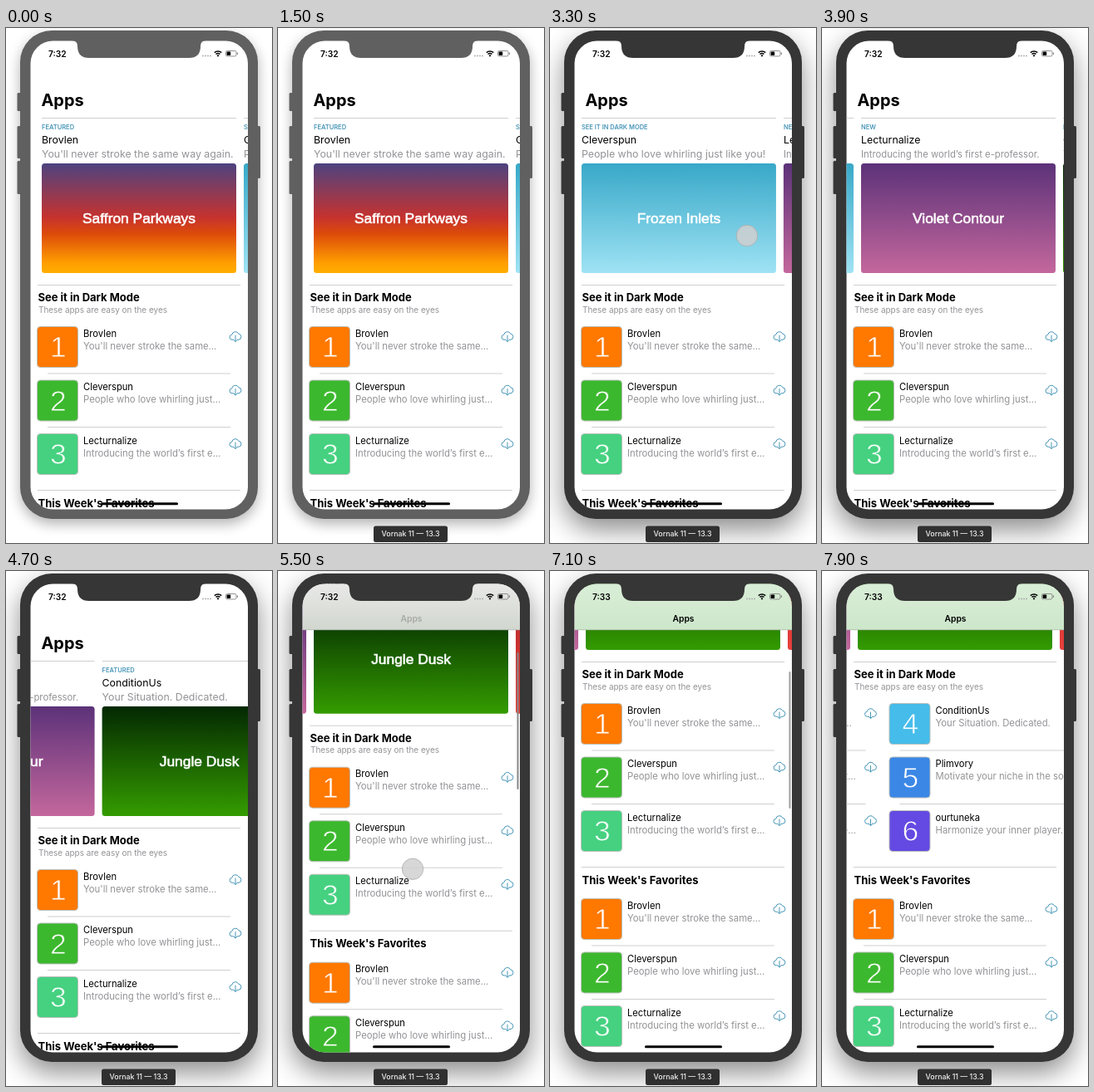
These frames come from a looping animation (320x620 px, 8 s). An HTML page:

```html
<!DOCTYPE html>
<html lang="en">
<head>
<meta charset="utf-8">
<title>Apps browser</title>
<style>
html, body { margin: 0; width: 100%; height: 100%; overflow: hidden; background: #fff; }
svg { display: block; width: 320px; height: 620px; }
text { font-family: Inter, "Open Sans", sans-serif; white-space: pre; }
.poster { font-family: "Liberation Sans", Arial, sans-serif; }
</style>
</head>
<body>
<svg id="stage" viewBox="0 0 320 620" xmlns="http://www.w3.org/2000/svg"></svg>
<script>
const LOOP = 8000, CARD_PITCH = 243, LIST_PITCH = 261, ROW = 64.5, SECTION = 235;
const GRAY = '#939397', BLUE = '#4796b8', RULE = '#cfcfd1';

const cards = [
  { tag: 'FEATURED', name: 'Brovlen', line: "You'll never stroke the same way again.", title: 'Saffron Parkways',
    stops: ['#4d437f', '#8a3b58 25%', '#c5322f 49%', '#dc4a0a 64%', '#ff9f00 91%', '#ffae00'] },
  { tag: 'SEE IT IN DARK MODE', name: 'Cleverspun', line: 'People who love whirling just like you!', title: 'Frozen Inlets',
    stops: ['#38a8c8', '#9fe3f4'] },
  { tag: 'NEW', name: 'Lecturnalize', line: 'Introducing the world’s first e-professor.', lineSize: 11.3, title: 'Violet Contour',
    stops: ['#5c3279', '#c4679d'] },
  { tag: 'FEATURED', name: 'ConditionUs', line: 'Your Situation. Dedicated.', title: 'Jungle Dusk',
    stops: ['#032802', '#349c00'] },
  { tag: 'FEATURED', name: 'Plimvory', line: 'Motivate your niche.', title: 'Red Lantern',
    stops: ['#b82a2a', '#e8403c'] }
];

const apps = [
  ['Brovlen', "You'll never stroke the same...", '#ff7800'],
  ['Cleverspun', 'People who love whirling just...', '#3cb82e'],
  ['Lecturnalize', 'Introducing the world’s first e...', '#45d180'],
  ['ConditionUs', 'Your Situation. Dedicated.', '#45bcea'],
  ['Plimvory', 'Motivate your niche in the so...', '#3b87e6'],
  ['ourtuneka', 'Harmonize your inner player...', '#644ae2']
];

const text = (x, midY, size, str, attrs = '') =>
  `<text x="${x}" y="${midY + size * 0.36}" font-size="${size}" ${attrs}>${str}</text>`;
const rect = (x, y, w, h, fill, attrs = '') =>
  `<rect x="${x}" y="${y}" width="${w}" height="${h}" fill="${fill}" ${attrs}/>`;
const rule = (x, y, w) => rect(x, y - 0.5, w, 1, RULE);

const gradient = (stops, i) => `<linearGradient id="paint${i}" x1="0" y1="0" x2="0" y2="1">` +
  stops.map((stop, k) => {
    const [color, at] = stop.split(' ');
    return `<stop offset="${at || (k ? '100%' : '0%')}" stop-color="${color}"/>`;
  }).join('') + '</linearGradient>';

const card = (c, i) => `<g transform="translate(${43 + i * CARD_PITCH} 0)">` +
  rule(0, 108.5, 234) +
  text(0, 119.5, 7.5, c.tag, `font-weight="600" fill="${BLUE}"`) +
  text(0, 134.5, 12.35, c.name) +
  text(0, 151.5, c.lineSize || 12.35, c.line, `fill="${GRAY}"`) +
  rect(0, 163, 234, 132, `url(#paint${i})`, 'rx="3.5"') +
  text(117, 229, 17.4, c.title, 'class="poster" text-anchor="middle" fill="#fff" stroke="#fff" stroke-width=".6"') + '</g>';

const cloud = `<path d="M273.5 375.3h-1.2a3 3 0 0 1-.5-6a4.2 4.2 0 0 1 8-1.1a3.6 3.6 0 0 1 .2 7.1h-1.5
  M276 370v7.4m-2.2-2.1l2.2 2.3l2.2-2.3" fill="none" stroke="${BLUE}" stroke-width="1"
  stroke-linecap="round" stroke-linejoin="round"/>`;

// The tile-coloured stroke on the digit thins it to a light weight.
const appRow = ([name, line, color], i) =>
  `<g transform="translate(${Math.floor(i / 3) * LIST_PITCH} ${i % 3 * ROW})">` +
  rect(37.5, 359.5, 49, 49, color, 'rx="4" stroke="#b9bfba" stroke-width="1"') +
  text(62.8, 383.5, 35.5, i + 1, `class="poster" text-anchor="middle" fill="#fff" stroke="${color}" stroke-width=".8"`) +
  text(93, 367.5, 11.2, name) +
  text(93, 382.5, 11.3, line, `fill="${GRAY}"`) + cloud +
  (i % 3 < 2 ? rule(50, 416, 220) : '') + '</g>';

const section = (n, title, sub, rows) => `<g transform="translate(0 ${n * SECTION})">` +
  rule(38, n ? 321.5 : 309.5, 244) +
  text(38.5, n ? 337 : 324.5, 13, title, 'font-weight="700"') +
  (sub ? text(39, 339, 9.95, sub, `fill="${GRAY}"`) : '') +
  `<g ${n ? '' : 'id="list"'}>${rows.map(appRow).join('')}</g></g>`;

const statusBar = text(51, 31.5, 10.2, '7:32', 'id="clock" font-weight="600"') +
  [237, 240, 243, 246].map(x => `<circle cx="${x}" cy="33.5" r=".9" fill="#aaa"/>`).join('') +
  `<path d="M250.8 29.6a6.2 6.2 0 0 1 8.4 0M252.5 31.5a3.8 3.8 0 0 1 5 0" fill="none" stroke="#000" stroke-width="1.5"/>
  <path d="M253.6 33a2 2 0 0 1 2.8 0L255 34.8z"/>` +
  rect(264.5, 27.5, 12.5, 6.5, 'none', 'rx="1.8" stroke="#777" stroke-width=".8"') +
  rect(265.6, 28.6, 4.6, 4.3, '#000', 'rx=".7"') + rect(277.8, 29.5, 1, 2.5, '#777');

const outline = 'x="17" y="3" width="286" height="588" rx="38"';
const stage = document.getElementById('stage');
stage.innerHTML = `<defs>
  ${cards.map((c, i) => gradient(c.stops, i)).join('')}
  <linearGradient id="navPaint" x1="0" y1="0" x2="0" y2="1">
    <stop id="navTop" offset="0"/><stop id="navBottom" offset="1"/>
  </linearGradient>
  <clipPath id="screen"><rect x="29.5" y="15.5" width="261.5" height="564" rx="27"/></clipPath>
  <filter id="soft" x="-30%" y="-20%" width="160%" height="140%"><feGaussianBlur stdDeviation="8"/></filter>
  <filter id="deep" x="-30%" y="-20%" width="160%" height="140%"><feGaussianBlur stdDeviation="16"/></filter>
</defs>
<rect width="320" height="620" fill="#fff"/>
<rect id="restShadow" ${outline} transform="translate(0 6)" opacity=".3" filter="url(#soft)"/>
<rect id="liveShadow" ${outline} transform="translate(0 13)" opacity=".45" filter="url(#deep)"/>
<g id="shell">
  ${rect(13.5, 78, 6, 22, 'inherit', 'rx="1.5"')}${rect(13.5, 118, 6, 39, 'inherit', 'rx="1.5"')}
  ${rect(13.5, 160, 6, 40, 'inherit', 'rx="1.5"')}${rect(300, 118, 6, 63, 'inherit', 'rx="1.5"')}
  <rect ${outline}/>
</g>
<g clip-path="url(#screen)">
  <rect x="29" y="15" width="263" height="566" fill="#fff"/>
  <g id="page">
    ${text(42.5, 86.7, 19.9, 'Apps', 'font-weight="700"')}
    <g id="carousel">${cards.map(card).join('')}</g>
    ${section(0, 'See it in Dark Mode', 'These apps are easy on the eyes', apps)}
    ${section(1, 'This Week\'s Favorites', '', apps.slice(0, 3))}
    ${section(2, 'Learn Something', '', apps.slice(0, 3))}
  </g>
  <g id="nav">
    ${rect(29, 15, 263, 56, 'url(#navPaint)')}
    ${rect(29, 70.5, 263, 0.7, '#a9b3a8')}
    ${text(160.5, 57.5, 10.3, 'Apps', 'id="navTitle" text-anchor="middle" font-weight="600"')}
  </g>
  <rect id="thumb" x="287.5" width="2" height="165" rx="1" fill="#858585"/>
  ${statusBar}
  ${rect(114, 571.3, 93, 3, '#000', 'rx="1.5"')}
  <circle id="touch" r="12.7" fill="#d0d0d0" fill-opacity=".85" stroke="#adadad" stroke-width=".8"/>
</g>
<path id="notch" d="M79 15h162q-7 0-7 7q0 14-14 14H100q-14 0-14-14q0-7-7-7z"/>
<g id="label">
  ${rect(115, 599.5, 89, 19.5, '#303030', 'rx="2.5"')}
  ${text(159.5, 609.3, 8.8, 'Vornak 11 — 13.3', 'text-anchor="middle" font-weight="500" fill="#f0f0f0"')}
</g>`;

const el = {};
stage.querySelectorAll('[id]').forEach(node => { el[node.id] = node; });
const set = (node, attrs) => Object.entries(attrs).forEach(([k, v]) => node.setAttribute(k, v));
const ramp = (t, a, b) => Math.min(1, Math.max(0, (t - a) / (b - a)));
const easeInOut = p => p < 0.5 ? 4 * p ** 3 : 1 - 4 * (1 - p) ** 3;
const mix = (a, b, p) => `rgb(${a.map((v, i) => Math.round(v + (b[i] - v) * p))})`;

// Monotone cubic through [time, value] points.
function track(t, keys) {
  if (t <= keys[0][0]) return keys[0][1];
  const i = keys.findIndex(k => k[0] > t);
  if (i < 0) return keys[keys.length - 1][1];
  const slope = k => k < 1 || k >= keys.length ? 0
    : (keys[k][1] - keys[k - 1][1]) / (keys[k][0] - keys[k - 1][0]);
  const tangent = k => {
    const a = slope(k), b = slope(k + 1);
    return a * b > 0 ? 2 * a * b / (a + b) : 0;
  };
  const [t0, v0] = keys[i - 1], [t1, v1] = keys[i], d = t1 - t0, p = (t - t0) / d;
  return v0 * (1 + 2 * p) * (1 - p) ** 2 + v1 * p * p * (3 - 2 * p) +
    d * p * (1 - p) * (tangent(i - 1) * (1 - p) - tangent(i) * p);
}

const SWIPE_TIME = 900;
const cardSwipes = [2080, 3145, 4180], listSwipe = 7313;
const scrollKeys = [[5100, 0], [5500, 123], [5900, 223], [6300, 250], [6500, 250], [6950, 200]];
const fingerY = [[5100, 482], [5500, 359], [5900, 271], [6100, 258], [6460, 258], [6950, 308]];
const fingerX = [[5100, 150], [5500, 162], [5900, 178]];
const swiped = (t, start) => easeInOut(ramp(t, start, start + SWIPE_TIME));

function touchAt(t) {
  for (const start of [...cardSwipes, listSwipe]) {
    if (t < start || t > start + SWIPE_TIME / 2) continue;
    const list = start === listSwipe;
    return [242 - swiped(t, start) * (list ? LIST_PITCH : CARD_PITCH), list ? 262 : 250];
  }
  if ((t > 5100 && t < 6100) || (t > 6460 && t < 6950)) return [track(t, fingerX), track(t, fingerY)];
  return null;
}

function draw(t) {
  const scroll = track(t, scrollKeys);
  const cardShift = cardSwipes.reduce((sum, start) => sum + CARD_PITCH * swiped(t, start), 0);
  set(el.page, { transform: `translate(0 ${-scroll})` });
  set(el.carousel, { transform: `translate(${-cardShift} 0)` });
  set(el.list, { transform: `translate(${-LIST_PITCH * swiped(t, listSwipe)} 0)` });

  const green = track(t, [[5500, 0], [5900, 1], [6500, 1], [6950, 0.75]]);
  set(el.nav, { opacity: ramp(scroll, 32, 50) });
  set(el.navTop, { 'stop-color': mix([233, 233, 231], [211, 239, 210], green) });
  set(el.navBottom, { 'stop-color': mix([209, 214, 207], [204, 236, 202], green) });
  set(el.navTitle, { opacity: track(t, [[5300, 0], [5500, 0.22], [5800, 1]]) });
  set(el.thumb, { y: 98 + (scroll - 123) * 0.3, opacity: ramp(t, 5100, 5250) * (1 - ramp(t, 7050, 7300)) });
  el.clock.textContent = t < 6800 ? '7:32' : '7:33';

  const live = ramp(t, 1600, 1750);
  const shellColor = mix([96, 96, 96], [54, 54, 54], live);
  set(el.shell, { fill: shellColor });
  set(el.notch, { fill: shellColor });
  set(el.restShadow, { opacity: 0.3 * (1 - live) });
  set(el.liveShadow, { opacity: 0.45 * live });
  set(el.label, { opacity: ramp(t, 450, 650) });

  const touch = touchAt(t);
  set(el.touch, touch ? { cx: touch[0], cy: touch[1], opacity: 1 } : { opacity: 0 });
}

const began = performance.now();
function tick() {
  draw((performance.now() - began) % LOOP);
  requestAnimationFrame(tick);
}
tick();
</script>
</body>
</html>
```
